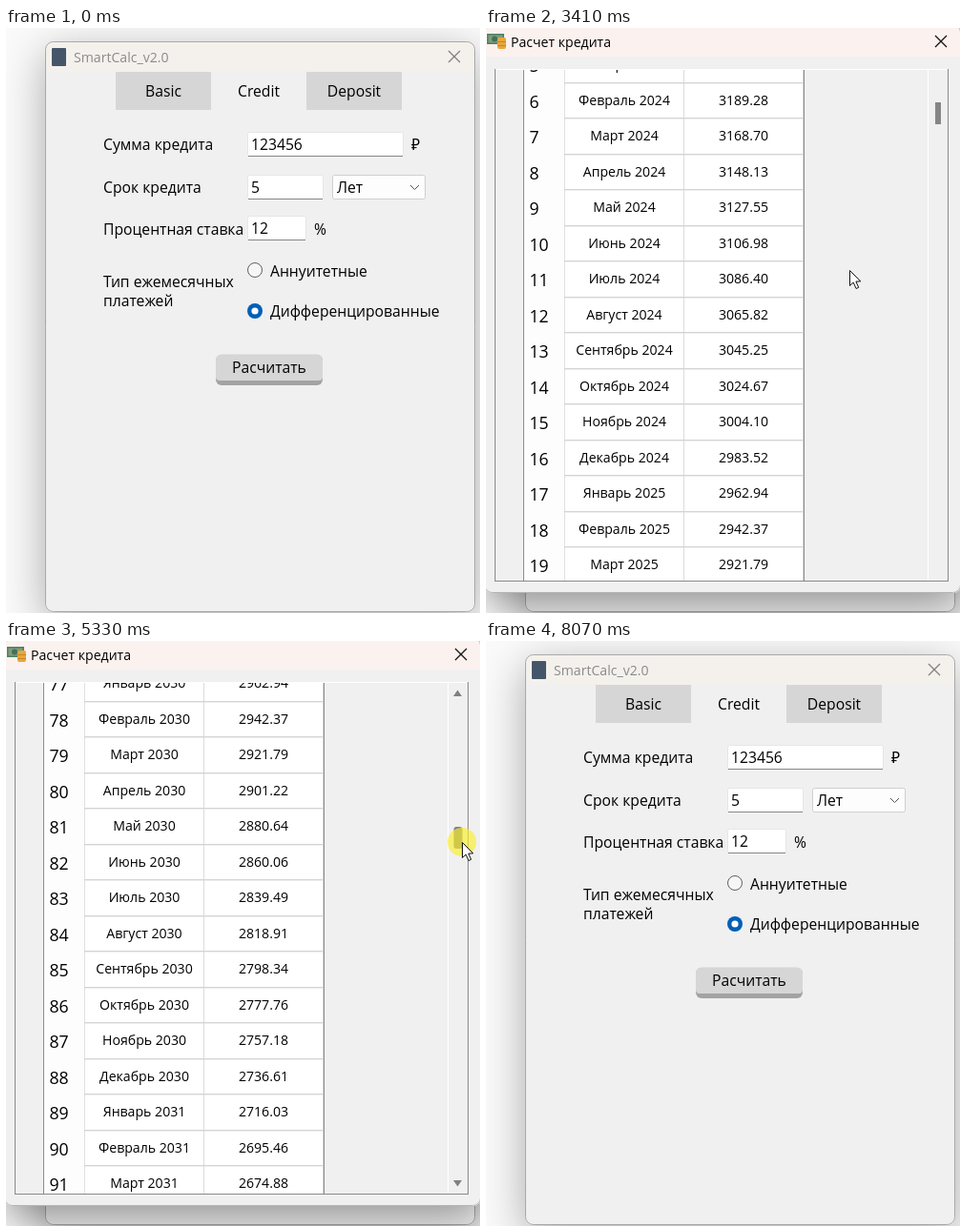
Write an HTML page with a canvas that moves like this. It is 497x614 px and loops after 8.21 s.

```html
<!DOCTYPE html>
<html lang="ru">
<head>
<meta charset="utf-8">
<title>SmartCalc</title>
<style>
html, body { margin: 0; width: 497px; height: 614px; overflow: hidden; background: #fafafa; }
canvas { display: block; }
</style>
</head>
<body>
<canvas id="stage" width="497" height="614"></canvas>
<script>
const c = document.getElementById('stage').getContext('2d');
const LOOP = 8210, OPEN = 2180, CLOSE = 7210, CLOSED = 7470;
const BODY = 15.7, SMALL = 14.1, LARGE = 17.7, HEADING = 18;
const MONTHS = 'Январь Февраль Март Апрель Май Июнь Июль Август Сентябрь Октябрь Ноябрь Декабрь'.split(' ');

// Credit: 123456 over 60 months at 12% a year; the table repeats the schedule.
const PRINCIPAL = 123456, TERM = 60, ROWS = 300;
const ROW_H = 37.5, FIRST_ROW = 169.5, MAX_SCROLL = 10852;
const TRACK_TOP = 65, TRACK = 471, GRIP = 16;

// Pointer path: time, x, y
const PATH = [
  [400, 420, 606], [1020, 280, 353], [2580, 280, 353], [2990, 381, 254],
  [4370, 381, 254], [4860, 478, 107.04], [4900, 478, 107.04], [5330, 478, 210.93],
  [6030, 478, 552], [6370, 478, 625], [6650, 478, 625], [7070, 474, 18],
  [7210, 474, 18], [7470, 398, 293], [7550, 275, 560], [7620, 270, 640]
];

const clamp = (v, a = 0, b = 1) => Math.min(b, Math.max(a, v));
const ramp = (t, a, b) => clamp((t - a) / (b - a));
const within = (t, a, b) => t >= a && t < b;

function pointer(t) {
  if (t < PATH[0][0] || t >= 7620) return null;
  const i = PATH.findIndex(p => p[0] > t);
  const [t0, x0, y0] = PATH[i - 1], [t1, x1, y1] = PATH[i];
  const u = ramp(t, t0, t1);
  return { x: x0 + (x1 - x0) * u, y: y0 + (y1 - y0) * u };
}

function scrollAt(t, p) {
  if (t < 3060) return 0;
  if (t < 4020) return 75 * Math.min(7, 1 + Math.floor((t - 3060) / 90));
  if (t < 4900) return 600;
  if (t > 6030) return MAX_SCROLL;
  return Math.round(clamp((p.y - GRIP - TRACK_TOP) / TRACK * MAX_SCROLL, 600, MAX_SCROLL));
}

function rect(x, y, w, h, fill) {
  c.fillStyle = fill;
  c.fillRect(x, y, w, h);
}

function round(x, y, w, h, r, fill, stroke) {
  c.beginPath();
  c.roundRect(x, y, w, h, r);
  if (fill) { c.fillStyle = fill; c.fill(); }
  if (stroke) { c.strokeStyle = stroke; c.lineWidth = 1; c.stroke(); }
}

function disc(x, y, r, fill, stroke) {
  c.beginPath();
  c.arc(x, y, r, 0, 7);
  c.fillStyle = fill;
  c.fill();
  if (stroke) { c.strokeStyle = stroke; c.lineWidth = 1; c.stroke(); }
}

function poly(points, stroke, fill, width = 1) {
  c.beginPath();
  points.forEach(([x, y]) => c.lineTo(x, y));
  if (fill) { c.closePath(); c.fillStyle = fill; c.fill(); }
  if (stroke) { c.strokeStyle = stroke; c.lineWidth = width; c.stroke(); }
}

function text(s, x, y, size = BODY, fill = '#000', align = 'left') {
  c.font = `${size}px "Open Sans", "Noto Sans", sans-serif`;
  c.textAlign = align;
  c.fillStyle = fill;
  c.fillText(s, x, y);
}

function cross(x, y, color) {
  poly([[x - 6, y - 6], [x + 6, y + 6]], color, null, 1.2);
  poly([[x + 6, y - 6], [x - 6, y + 6]], color, null, 1.2);
}

function panel(x, y, w, h, blur, shade) {
  c.save();
  c.shadowColor = shade;
  c.shadowBlur = blur;
  c.shadowOffsetY = 12;
  round(x, y, w, h, 8, '#f0f0f0');
  c.restore();
}

function field(x, y, w, value) {
  round(x + .5, y + .5, w - 1, 25, 2, '#fff', '#e6e6e6');
  rect(x + 1, y + 25, w - 2, 1, '#868686');
  text(value, x + 4, y + 19);
}

function button(t) {
  const hover = within(t, 950, OPEN + 70), down = within(t, 1160, 1640);
  const [face, edge] = down ? ['#b5d4fb', '#8fa8c8'] : hover ? ['#c5dfff', '#9aaecb'] : ['#d6d6d6', '#a3a3a3'];
  round(220, 343, 112, 32, 6, edge);
  round(220, 342.5, 112, 27.5, [6, 6, 4, 4], face);
  text('Расчитать', 276, 362, BODY, '#000', 'center');
}

function mainWindow(t) {
  rect(0, 0, 497, 614, '#fafafa');
  panel(41, 14, 451, 599, 46, 'rgba(0,0,0,.32)');
  round(41.5, 14.5, 450, 32, [8, 8, 0, 0], t < 70 || t >= 8070 ? '#f4f1ed' : '#f3f3f3');
  rect(42, 46, 449, 2, '#f0f0f0');
  round(41.5, 14.5, 450, 598, 8, null, '#a9a9a9');
  round(48, 21, 15, 19, 1, '#46566a');
  text('SmartCalc_v2.0', 71, 36, SMALL, '#8a8a8a');
  cross(470, 30, '#808080');

  rect(115, 46, 100, 40, '#d6d6d6');
  rect(315, 46, 100, 40, '#d6d6d6');
  ['Basic', 'Credit', 'Deposit'].forEach((s, i) => text(s, 165 + i * 100, 72, BODY, '#000', 'center'));

  text('Сумма кредита', 102, 128);
  text('Срок кредита', 102, 173);
  text('Процентная ставка', 102, 217);
  text('Тип ежемесячных', 102, 272);
  text('платежей', 102, 292);
  field(253, 109, 164, '123456');
  field(253, 154, 80, '5');
  field(253, 197, 62, '12');
  text('₽', 425, 128);
  text('%', 323, 217);
  round(342.5, 154.5, 97, 25, 2, '#fdfdfd', '#cfcfcf');
  text('Лет', 347, 173);
  poly([[424, 165], [428.5, 169.5], [433, 165]], '#555');

  disc(261, 254, 7.5, '#f6f6f6', '#606060');
  disc(261, 297, 8, '#005fb8');
  disc(261, 297, 3.6, '#fff');
  text('Аннуитетные', 277, 261);
  text('Дифференцированные', 277, 303);
  button(t);
}

function table(scroll) {
  const top = 134 - scroll, head = Math.max(top, 0);
  const end = Math.min(Math.floor(FIRST_ROW + ROWS * ROW_H - scroll), 600);
  rect(39, head, 295, end - head + 1, '#8c8c8c');
  rect(40, head, 293, end - head, '#fdfdfd');
  rect(82, head, 251, end - head, '#fff');
  rect(82, head, 1, end - head, '#e0e0e0');
  rect(207, head, 1, end - head, '#dcdcdc');
  rect(332, head, 1, end - head, '#d6d6d6');
  text('Дата', 145, 159 - scroll, HEADING, '#000', 'center');
  text('Платеж', 270, 159 - scroll, HEADING, '#000', 'center');

  const first = Math.max(1, Math.floor((43 - FIRST_ROW + scroll) / ROW_H));
  const rowTop = n => Math.floor(FIRST_ROW + (n - 1) * ROW_H - scroll);
  for (let n = first; n <= ROWS && rowTop(n) < 590; n++) {
    const y = rowTop(n), month = n + 7, paid = (n - 1) % TERM;
    const sum = PRINCIPAL / TERM + (PRINCIPAL - PRINCIPAL / TERM * paid) * .01;
    rect(82, rowTop(n + 1), 251, 1.4, '#d4d4d4');
    text(n, 45.5, y + 27, LARGE);
    text(`${MONTHS[month % 12]} ${2023 + Math.floor(month / 12)}`, 145, y + 24, SMALL, '#000', 'center');
    text(sum.toFixed(2), 270, y + 24, SMALL, '#000', 'center');
  }
}

function scrollBar(t, scroll) {
  const y = TRACK_TOP + TRACK * scroll / MAX_SCROLL;
  rect(463, 44, 1, 536, '#fff');
  if (t < 4720) return rect(471, y, 6, 23, '#858585');
  const held = t < 6510, color = held ? '#808087' : '#cbcbcb';
  poly([[469, 58], [473.5, 51.5], [478, 58]], null, color);
  poly([[469, 566], [473.5, 572.5], [478, 566]], null, color);
  if (held) round(469.5, y, 9, 23, 3, '#808087');
  else rect(470, y, 7, 23, '#808087');
}

function moneyIcon() {
  rect(1, 6, 18, 11, '#4f7f63');
  rect(2.5, 7.5, 15, 8, '#7d9d7c');
  disc(9, 11.5, 3, '#476f58');
  round(12, 10, 9, 12, 2, '#e8a63c');
  rect(12, 14, 9, 1, '#c98426');
  rect(12, 18, 9, 1, '#c98426');
}

function resultWindow(t, scroll) {
  if (!within(t, OPEN, CLOSED)) return;
  const enter = ramp(t, OPEN - 30, OPEN + 570), leave = ramp(t, CLOSE - 40, CLOSED);
  const moving = t < OPEN + 400;
  const scale = t < CLOSE ? 1 - .15 * (1 - enter) ** 3 : 1 - .1 * leave;
  c.save();
  c.globalAlpha = t < CLOSE ? ramp(t, OPEN - 50, OPEN + 190) : 1 - leave;
  c.translate(205, 265);
  c.scale(scale, scale);
  c.translate(-205, -265);

  panel(-2, -4, 500, 597, 44, 'rgba(0,0,0,.4)');
  round(-2, -4, 500, 34, [8, 8, 0, 0], '#fbf1ee');
  round(-1.5, -3.5, 499, 596, 8, null, '#b4b4b4');
  moneyIcon();
  text('Расчет кредита', 26, 20, SMALL);
  cross(477, 14, t > 7000 ? '#555' : '#111');

  c.save();
  c.beginPath();
  c.rect(9, 43, 476, 537);
  c.clip();
  if (scroll < 120) {
    text('Начисленные проценты', 38.5, 86 - scroll, HEADING);
    text('Долг + проценты', 38.5, 109 - scroll, HEADING);
    text('3292.16', 258.7, 73.5 - scroll, LARGE);
    text('....', 335, 73.5 - scroll, LARGE);
    text('2078.18', 367.5, 73.5 - scroll, LARGE);
    text('682094.40', 258.7, 97 - scroll, LARGE);
    text('805550.40', 258.7, 120 - scroll, LARGE);
  }
  table(scroll);
  scrollBar(t, scroll);
  c.restore();

  rect(9, 43, 476, 1, moving ? '#8a8a8e' : '#fff');
  rect(9, 43, 1, 538, '#8a8a8e');
  rect(484, 43, 1, 538, '#8a8a8e');
  rect(9, 580, 476, 1, '#8a8a8e');
  c.restore();
}

function highlight(t, p) {
  let r = 15, alpha = 0;
  if (within(t, 1160, 1780)) {
    r = 8 + 13 * ramp(t, 1090, 1440);
    alpha = 1 - ramp(t, 1580, 1780);
  } else if (within(t, 4900, 6370)) alpha = 1;
  if (alpha) disc(p.x, p.y, r, `rgba(250,238,40,${alpha * .65})`);
}

function arrow({ x, y }) {
  c.save();
  c.translate(Math.round(x) + .5, Math.round(y) + .5);
  c.lineJoin = 'round';
  poly([[0, 0], [0, 16], [3.7, 12.6], [6.6, 19], [9.2, 17.8], [6.4, 11.6], [11.3, 11.4], [0, 0]], '#111', '#fff');
  c.restore();
}

function frame(now) {
  const t = now % LOOP;
  // The pointer moves in steps of 70 ms.
  const step = Math.floor((t - 10) / 70) * 70 + 10;
  const p = pointer(step);
  mainWindow(t);
  resultWindow(t, scrollAt(within(t, 4900, 6100) ? step : t, p));
  if (p) {
    highlight(t, p);
    arrow(p);
  }
  requestAnimationFrame(frame);
}
requestAnimationFrame(frame);
</script>
</body>
</html>
```
